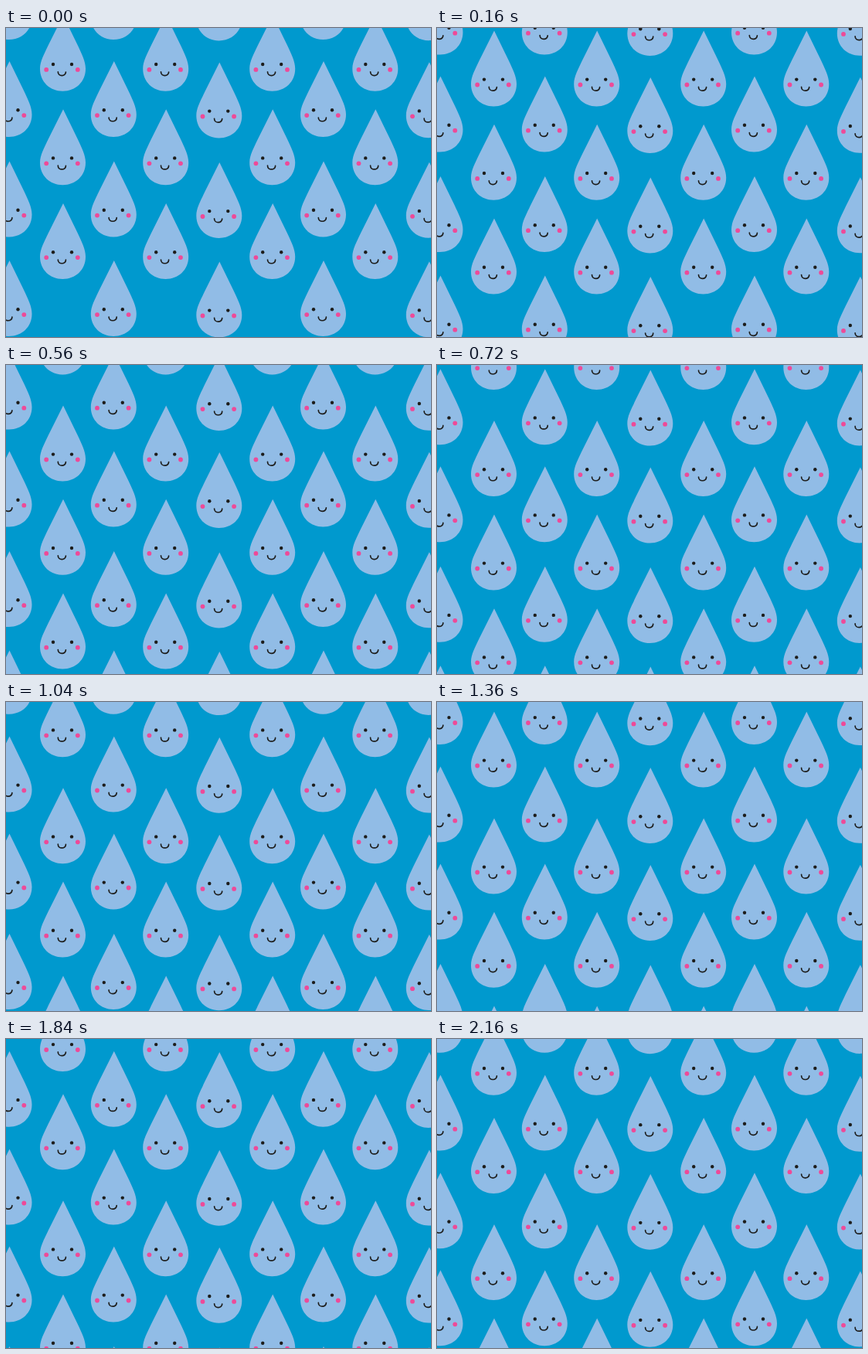
These frames come from a looping animation (550x400 px, 2.24 s). An HTML page:

```html
<!DOCTYPE html>
<html lang="en">
<head>
<meta charset="utf-8">
<title>Smiling raindrops</title>
<style>
  html, body { margin: 0; width: 100%; height: 100%; overflow: hidden; background: #0099ce; }
  svg { display: block; width: 550px; height: 400px; }
</style>
</head>
<body>
<svg viewBox="0 0 550 400">
  <defs>
    <!-- the tip of the drop is the local origin -->
    <g id="drop">
      <path fill="#91bce6" d="M0 0L18.5 38C24 50 29 59 29 69C29 86 16 98 -.7 98C-17 98 -30 86 -30 69C-30 59 -24.5 50 -19 38Z"/>
      <g fill="#1d1d1b">
        <circle cx="-13" cy="63.2" r="2.2"/>
        <circle cx="11" cy="63.2" r="2.2"/>
      </g>
      <g fill="#ee4a98">
        <circle cx="-21.8" cy="70.1" r="2.9"/>
        <circle cx="18.8" cy="70.1" r="2.9"/>
      </g>
      <path fill="none" stroke="#1d1d1b" stroke-width="1.7" stroke-linecap="round" d="M-6.7 73C-6.7 79.3 3.4 79.3 3.4 73.2"/>
    </g>
  </defs>
  <g id="rain"></g>
</svg>
<script>
const rain = document.getElementById('rain');
const STEP = 80, STEPS = 28, SPEED = 9.8, LAST = 26.15;

// Starting tip heights for the two alternating kinds of column
const inner = [227, 105.2, -16.2, -154.2, -281.5];
const outer = [301, 172.5, 43, -83, -209.7, -336.5];

const columns = [
  [4.5, 0, outer], [74, 0, inner], [139.8, 0, outer], [207.2, 0, inner],
  [276.3, 1.4, outer], [345.2, 0, inner], [411, 0, outer], [478.3, 0, inner],
  [547.8, 1.2, outer]
];

rain.innerHTML = columns.map(([x, dy, tips]) =>
  tips.map(y => `<use href="#drop" x="${x}" y="${y + dy}"/>`).join('')
).join('');

// The fall is linear and stops just before the loop restarts
function draw() {
  const step = Math.floor(performance.now() / STEP) % STEPS;
  rain.setAttribute('transform', `translate(0 ${SPEED * Math.min(step, LAST)})`);
  requestAnimationFrame(draw);
}
draw();
</script>
</body>
</html>
```
